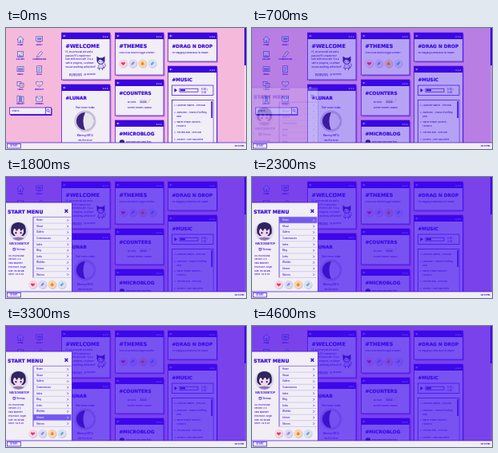
Recreate the animation shown at these times as an HTML page. Size 300 by 152 pixels, loop 4700 ms.

```html
<!DOCTYPE html>
<html lang="en">
<head>
<meta charset="utf-8">
<title>Desktop with start menu</title>
<style>
:root { --ink: #3907df; --paper: #f1eef5; --pink: #f5b9dc; --loop: 4.7s; }
html, body { margin: 0; width: 100%; height: 100%; overflow: hidden; background: var(--pink); }
svg { display: block; width: 100vw; height: 100vh; }
text { font-family: Inter, "Open Sans", sans-serif; font-weight: 500; fill: var(--ink); }
.head { font-family: "DejaVu Sans", sans-serif; font-weight: 700; stroke: var(--ink); stroke-width: .2; }
.bold { font-weight: 700; }
.ink { fill: var(--ink); }
.paper { fill: var(--paper); }
.line { fill: none; stroke: var(--ink); stroke-width: .7; }
.box { fill: var(--paper); stroke: var(--ink); stroke-width: .7; }
.light, text.light { fill: #fff; }
.icon { stroke: #4a35b5; stroke-width: .6; fill: #dcd7f2; }
.tint { fill: #7d83cf; }
.warm { fill: #e2a083; }

#veil { fill: #3f08f2; opacity: 0; animation: dim var(--loop) infinite; }
#menu { animation: rise var(--loop) infinite, show var(--loop) infinite; }
.hot { opacity: 0; animation: hover var(--loop) infinite; }

@keyframes dim {
  0%, 12.77% { opacity: 0; animation-timing-function: ease-out; }
  19.15%, 100% { opacity: .67; }
}
@keyframes rise {
  0%, 12.77% { transform: translateY(88px); animation-timing-function: cubic-bezier(.165, .84, .44, 1); }
  27.2%, 100% { transform: none; }
}
@keyframes show {
  0%, 12.77% { opacity: 0; animation-timing-function: ease-in; }
  18.09%, 100% { opacity: 1; }
}
@keyframes hover {
  0%, 2.55% { opacity: 1; }
  2.56%, 100% { opacity: 0; }
}
</style>
</head>
<body>
<svg viewBox="0 0 300 152" preserveAspectRatio="none">
  <rect width="300" height="152" fill="#f5b9dc"/>
  <g id="desk"></g>
  <g id="cards"></g>
  <rect x="298" width="2" height="152" fill="#f7dcec"/>
  <rect class="ink" x="298" width="2" height="47"/>
  <rect id="veil" width="300" height="152"/>
  <g id="menu"></g>
  <g id="bar"></g>
</svg>
<script>
const put = (id, parts) => { document.getElementById(id).innerHTML = parts.join(''); };
const rect = (x, y, w, h, cls = 'box', more = '') =>
  `<rect x="${x}" y="${y}" width="${w}" height="${h}" class="${cls}" ${more}/>`;
const disc = (x, y, r, fill) => `<circle cx="${x}" cy="${y}" r="${r}" fill="${fill}"/>`;
const path = (d, cls = 'line', more = '') => `<path d="${d}" class="${cls}" ${more}/>`;
const text = (x, y, s, size = 2.9, cls = '', anchor = 'start') =>
  `<text x="${x}" y="${y}" font-size="${size}" class="${cls}" text-anchor="${anchor}">${s}</text>`;
const mid = (x, y, s, size, cls) => text(x, y, s, size, cls, 'middle');
const lines = (x, y, step, list, size) => list.map((s, i) => text(x, y + i * step, s, size)).join('');
const at = (x, y, s) => `<g transform="translate(${x} ${y})">${s}</g>`;

const pages = ['Home', 'About', 'Gallery', 'Commissions', 'Index', 'Blog', 'Links', 'Wishlist', 'Library', 'Shrines'];

// Desktop icons, drawn around their own centre
const icons = [
  path('M-4 0L0-4L4 0H3V4H-3V0Z', 'icon') + rect(-1, 1, 2, 3, 'tint'),
  rect(-4, -3.5, 8, 5.5, 'icon') + rect(-2.7, -2.2, 5.4, 3, 'tint') + path('M-2.5 3.5H2.5', 'icon'),
  rect(-3.5, -3.5, 7, 7, 'icon') + path('M-3 3L-1 0L1 2L2 1L3 3Z', 'tint') + disc(1.3, -1.4, 1, '#e2a083'),
  path('M-3.5 3.5L-2 1L2-4L4-2L0 3Z', 'icon') + path('M-3 3L-2 1L0 2.5Z', 'warm'),
  rect(-4, -3, 8, 6, 'icon') + rect(-3, -1.5, 6, 3.5, 'tint'),
  rect(-3, -4, 6, 8, 'icon') + path('M-2-2H2M-2 0H2M-2 2H1', 'icon'),
  rect(-4, -3, 5, 5, 'icon') + rect(-1, -1, 5, 5, 'icon') + rect(0, 0, 3, 3, 'warm'),
  path('M0 4L-4 0V-3H-1L0-2L1-3H4V0Z', 'icon') + path('M0 3L-2 0H2Z', 'warm'),
  rect(-4, -4, 2.4, 8, 'icon') + rect(-1.2, -4, 2.4, 8, 'tint') + rect(1.7, -3, 2.3, 7, 'icon'),
  rect(-4, -3, 8, 6, 'icon') + path('M-3.5-2.5L0 .5L3.5-2.5', 'icon')
];
put('desk', [
  ...pages.map((name, i) => {
    const x = i % 2 ? 41.7 : 18, y = 14.3 + Math.floor(i / 2) * 18.7;
    return at(x, y, icons[i]) + mid(x, y + 7.2, name.toUpperCase(), 2.3, 'bold');
  }),
  rect(5.5, 101, 52, 9, 'ink'),
  rect(4.5, 100, 52, 8.5),
  text(7.5, 105.2, 'Search...', 2.6),
  rect(49.5, 100, 7, 8.5),
  '<circle cx="52.5" cy="103.6" r="1.5" class="line"/>', path('M53.6 104.8L55 106.4')
]);

// Window frame with a blue title bar
function card(x, y, w, h, title, size, body) {
  return rect(x + 1.5, y + 1.5, w, h, 'ink', 'opacity=".35"') + rect(x, y, w, h) +
    rect(x, y, w, 8, 'ink') +
    path(`M${x + 5} ${y + 4}H${x + 2.3}M${x + 3.5} ${y + 2.8}L${x + 2.3} ${y + 4}L${x + 3.5} ${y + 5.2}`, 'line', 'style="stroke:#fff"') +
    [9, 6.5, 4].map(d => rect(x + w - d, y + 4.6, 1.4, .9, 'light')).join('') +
    text(x + 5, y + 17 + size * .36, title, size, 'head') + body;
}

const heart = 'M0 2.6L-2.6 0Q-2.8-2.4 0-1Q2.8-2.4 2.6 0Z';
const marks = [heart, 'M-2.2 2.2L-1.2-.7L1.2-2.2L2.2-1.2L.6 1.2Z', 'M-2.4 1L0-2.4L2.4 1L0 2.4Z', 'M-2.4 1L1-2.4L2.4-.5L-.5 2.4Z'];
const tones = [['#e93468', '#f9d5e2'], ['#7f8fdd', '#dcd9f1'], ['#e58a3e', '#f7d6ae'], ['#6aa9e0', '#d7e2f1']];
const themes = (x, y) => tones.map(([tone, fill], i) => at(x + i * 12.1, y,
  disc(.4, .6, 5.3, '#bdb3df') + disc(0, 0, 5.2, fill) + path(marks[i], '', `fill="${tone}"`))).join('');

const cat = at(118.5, 43.5,
  path('M-5-2L-5-8L-2-6H2L5-8V-2Q4 2 0 2T-5-2Z', '', 'fill="#33238f"') +
  path('M-3.4-1.5Q-2-4.5 0-3.5T3.4-1.5Q3 1.3 0 1.3T-3.4-1.5Z', 'paper') +
  rect(-2, -2, 1, 1.4, 'ink') + rect(1, -2, 1, 1.4, 'ink') +
  path('M-2 2H2L4.5 7H-4Z', 'icon') + path('M3 6Q7 6 5 1') + path('M-2 7V9.5M2 7V9.5'));

const moon = disc(99, 117, 13.5, '#c9c4dc') + disc(99, 117, 11, '#3c247f') +
  path('M99 106A11 11 0 0 1 99 128Q94 117 99 106Z', '', 'fill="#e9e5ed"');

const songs = [
  [98, 'Lavender Waters - Fern Hall'],
  [107, 'Awesome - Towns of Drifting'], [111.5, 'Mild'],
  [119, 'Warm Temple (Sunset) -'], [123.5, 'Hollow D'],
  [132, 'The Red Star - Fern Hall'],
  [141, 'Another - Fern Hall Nettle']
];

put('cards', [
  card(69.5, 6, 60.5, 59, '#WELCOME', 6.5,
    lines(74.5, 30.6, 4.9, ['Hi, my personal site and a', 'passion! It\'s experience', 'lush with neon cafe. It is a', 'safe in progress, so please', 'excuse anything unfinished!'], 2.75) +
    text(79, 59, 'By 888 level', 2.7) + path('M79 59.8H95', 'line', 'stroke-dasharray="1 .5"') +
    text(97.5, 59, '@ opensite', 2.7) + cat),
  card(69.5, 71, 60.5, 90, '#LUNAR', 5.7,
    mid(99, 101, 'Visit moon today', 3) + moon +
    mid(99, 136.3, 'Waning (68%)', 3) + mid(99, 142, 'Past full moon', 2.6)),
  card(136.5, 6, 60.5, 53, '#THEMES', 6.4,
    text(141.5, 31.5, 'Click on an emoji to toggle a theme!', 2.6) + themes(146.5, 44.5)),
  card(136.5, 65, 60.5, 45, '#COUNTERS', 5.8,
    text(152, 93.8, 'all visits:', 2.7) + rect(167, 90, 9, 4.4, '', 'fill="#d9cfe9"') +
    mid(171.5, 93.5, '30428', 2.6) + path('M177 94L181 89', 'line', 'style="stroke:#e9a15b"') +
    mid(167, 101, 'current viewers: NaN00', 2.7)),
  card(136.5, 116, 60.5, 45, '#MICROBLOG', 5.8,
    disc(145, 143.5, 3.2, '#33238f') + text(150, 143.5, 'New page and small fixes', 2.6)),
  card(202.5, 6, 61, 36, '#DRAG N DROP', 5.8,
    text(207.5, 31.5, 'Try dragging a window by its header!', 2.6)),
  card(202.5, 48, 61, 113, '#MUSIC', 5.7,
    rect(207.5, 72, 51.5, 12.5) +
    path('M210.5 75.7L214 78.2L210.5 80.7Z', 'ink') + rect(217, 76.2, 23, 4) + rect(218, 77.2, 6, 2, 'ink') +
    text(244, 78, '0:00 /', 2.9) + text(244, 82.2, '3:43', 2.9) +
    rect(207.5, 90.5, 51.5, 55) + rect(256, 90.9, 2.6, 54, 'paper') + rect(256.5, 92, 1.6, 21, 'ink') +
    songs.map(([y, s], i) => (i === 2 || i === 4 ? '' : disc(211, y - 1, .6, '#3907df')) + text(213.5, y, s, 2.7)).join(''))
]);

// Start menu
const rowY = i => 50.5 + i * 7.58;
const arrow = (y, color) => path(`M76.5 ${y + 2.6}l1.3 1.3l-1.3 1.3`, 'line', `style="stroke:${color}"`);
const row = (name, i) => {
  const y = rowY(i), label = cls => text(38, y + 4.8, name, 2.8, cls);
  return label() + arrow(y, '#3907df') +
    path(`M34.5 ${y + 7.58}H81.5`, 'line', 'style="stroke:#a99be8;stroke-width:.45"') +
    `<g class="hot" style="animation-delay:${2280 + 120 * i}ms">` +
    rect(34, y, 47.5, 7.3, '', 'fill="#7359ef"') + label('light') + arrow(y, '#fff') + '</g>';
};

const portrait = at(15.5, 68,
  disc(0, 0, 12, '#dcd7ec') +
  path('M-9 3Q-11-11 0-11Q11-11 9 3L6 6H-6Z', '', 'fill="#2f2560"') +
  path('M-6.5-3H6.5V2Q3 8 0 8T-6.5 2Z', '', 'fill="#f3dcdf"') +
  path('M-7 1L-5-4L-2 0L1-4L3 0L6-3L7 1L7-6Q0-11-7-6Z', '', 'fill="#2f2560"') +
  rect(-4, 1, 1.8, 2.3, 'ink') + rect(2.2, 1, 1.8, 2.3, 'ink') +
  path('M-7.5 9Q0 6 7.5 9Q0 14.5-7.5 9Z', '', 'fill="#8f78b4"'));

put('menu', [
  rect(0, 32, 82.5, 114, 'paper'), path('M0 32H82.5V146'),
  text(2, 45.5, 'START MENU', 6.2, 'head'),
  path('M73.5 40.8L77.3 44.8M77.3 40.8L73.5 44.8', 'line', 'style="stroke-width:1.3"'),
  path('M34 50.3H81.5', 'line', 'style="stroke-width:.5"'),
  portrait,
  mid(16.5, 85.4, 'NIA\'S DESKTOP', 3.2, 'bold'),
  rect(9, 89.5, 2.4, 2.6), text(13, 92.1, 'Sitemap', 2.8),
  lines(3, 99.5, 4.75, ['OS: PASTELINE', 'Version: 2.4', 'Task Machine', 'Processor: Angel', 'Size: 95.48 MB', 'Since: 03.11.23'], 2.7),
  path('M34 50V126.5'),
  ...pages.map(row),
  themes(33.5, 135)
]);

put('bar', [
  rect(0, 144, 300, 8, 'paper'), path('M0 144H300'),
  rect(1.3, 145.5, 17, 5.5), mid(9.8, 149.3, 'START', 2.9),
  text(297.5, 149.4, '06:51 PM', 2.6, 'bold', 'end')
]);
</script>
</body>
</html>
```
